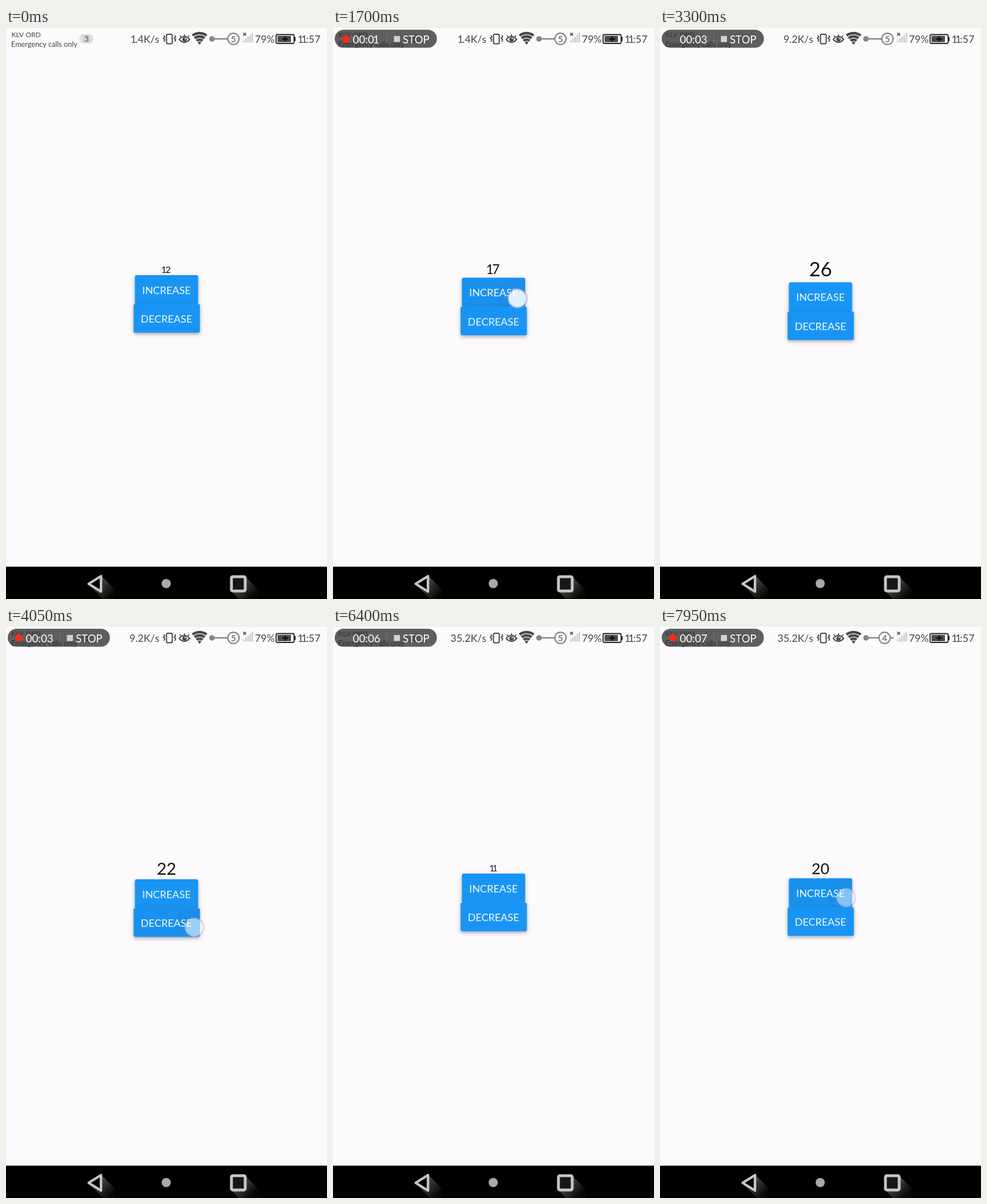
Write an HTML page with a canvas that moves like this. It is 561x998 px and loops after 8000 ms.

```html
<!DOCTYPE html>
<html lang="en">
<head>
<meta charset="utf-8">
<title>Counter</title>
<style>
html, body { margin: 0; width: 100%; height: 100%; overflow: hidden; background: #fcfafd; }
canvas { display: block; width: 100%; height: 100%; }
</style>
</head>
<body>
<canvas id="stage" width="561" height="998"></canvas>
<script>
const ctx = document.getElementById('stage').getContext('2d');
const LOOP = 8000, HOLD = 110, TIMER_START = 150;
const INK = '#444', GREY = '#858585', BLUE = '#1895f4';

// Each tap counts when the finger lifts.
const series = (start, period, count, step) =>
  Array.from({ length: count }, (_, i) => ({ at: start + i * period, step }));
const taps = [
  ...series(960, 157, 14, 1),
  ...series(3525, 165, 9, -1),
  ...series(4990, 130, 6, -1),
  ...series(6670, 155, 9, 1)
];

// Finger path: time, x, y
const path = [
  [960, 314, 468], [2400, 330, 477], [2900, 340, 482], [3100, 340, 484],
  [3400, 332, 534], [4050, 329, 525], [4900, 341, 513], [5640, 334, 508],
  [6500, 314, 462], [7950, 325, 473]
];

const clamp = v => Math.max(0, Math.min(1, v));

function fingerAt(t) {
  let i = 0;
  while (i < path.length - 2 && t > path[i + 1][0]) i++;
  const [t0, x0, y0] = path[i], [t1, x1, y1] = path[i + 1];
  const k = clamp((t - t0) / (t1 - t0));
  return [x0 + (x1 - x0) * k, y0 + (y1 - y0) * k];
}

function disc(x, y, r, color) {
  ctx.fillStyle = color;
  ctx.beginPath();
  ctx.arc(x, y, r, 0, 7);
  ctx.fill();
}

function box(x, y, w, h, r, color) {
  ctx.fillStyle = color;
  ctx.beginPath();
  ctx.roundRect(x, y, w, h, r);
  ctx.fill();
}

function outline(color, width, draw) {
  ctx.strokeStyle = color;
  ctx.lineWidth = width;
  ctx.beginPath();
  draw();
  ctx.stroke();
}

function poly(points) {
  points.forEach(([x, y], i) => i ? ctx.lineTo(x, y) : ctx.moveTo(x, y));
}

function setFont(size, color, weight = 400) {
  ctx.font = `${weight} ${size}px Lato, sans-serif`;
  ctx.fillStyle = color;
  ctx.textBaseline = 'alphabetic';
}

function text(str, x, mid, size, color, align = 'left') {
  setFont(size, color);
  ctx.textAlign = align;
  ctx.fillText(str, x, mid + size * 0.36);
}

// Proportional figures: the digit 1 takes less room than the others.
function figures(str, x, mid, size, color, align = 0) {
  setFont(size, color);
  ctx.textAlign = 'center';
  const widths = [...str].map(c => c === '1' ? size * 0.37 : ctx.measureText(c).width);
  x -= align * widths.reduce((a, b) => a + b, 0);
  [...str].forEach((c, i) => {
    ctx.fillText(c, x + widths[i] / 2, mid + size * 0.36);
    x += widths[i];
  });
}

function drawVibrate() {
  outline(INK, 2, () => ctx.roundRect(280.5, 11, 10, 16.5, 2));
  for (const x of [275, 294]) {
    outline(INK, 1.8, () => poly([[x + 1, 13], [x + 2.5, 15.5], [x, 18], [x + 2.5, 20.5], [x + 1, 24]]));
  }
}

function drawEye() {
  outline(INK, 2, () => {
    ctx.moveTo(302.5, 20);
    ctx.quadraticCurveTo(312, 9.5, 321, 20);
    ctx.quadraticCurveTo(312, 30, 302.5, 20);
  });
  disc(312, 20, 3.8, INK);
  disc(313.2, 18.7, 1.1, '#fcfafd');
  outline(INK, 1.6, () => {
    for (const [x, y, dx, dy] of [[312, 14, 0, -3], [306, 16, -2, -3], [318, 16, 2, -3]]) {
      ctx.moveTo(x, y);
      ctx.lineTo(x + dx, y + dy);
    }
  });
}

function drawWifi() {
  const from = -Math.PI * 0.71, to = -Math.PI * 0.29;
  for (const r of [20, 14.2, 8.6]) {
    outline('#484848', 4.4, () => ctx.arc(338.3, 29, r, from, to));
  }
  ctx.fillStyle = '#484848';
  ctx.beginPath();
  ctx.moveTo(338.3, 29.5);
  ctx.arc(338.3, 29, 5, from, to);
  ctx.fill();
}

function drawSlider(t) {
  const later = t >= 7000, x = later ? 392.5 : 397.5;
  disc(360, 19, 4.8, GREY);
  outline(GREY, 2.4, () => {
    ctx.moveTo(360, 19);
    ctx.lineTo(x - 10, 19);
    ctx.moveTo(x + 10, 19);
    ctx.lineTo(408.5, 19);
  });
  outline(GREY, 2.2, () => ctx.arc(x, 19, 9.8, 0, 7));
  setFont(15.5, '#777', 700);
  ctx.textAlign = 'center';
  ctx.fillText(later ? '4' : '5', x, 24.6);
}

function drawSignal() {
  for (let i = 0; i < 5; i++) {
    const h = 4 + i * 3.3;
    box(414.5 + i * 3.7, 25.5 - h, 2.5, h, 0, '#cbcacc');
  }
  outline(INK, 1.7, () => {
    poly([[414.5, 8.5], [419.5, 13.5]]);
    poly([[419.5, 8.5], [414.5, 13.5]]);
  });
}

function drawBattery() {
  outline('#222', 1.8, () => ctx.roundRect(472, 11.5, 31.5, 15.5, 2.5));
  box(504, 15.5, 2, 7.5, 0.5, '#222');
  box(474.5, 13.8, 23.5, 11, 0.5, '#4b4b4b');
  outline('#0c0c0c', 2.4, () => {
    poly([[483, 19.3], [493, 19.3]]);
    poly([[488, 14.6], [488, 24]]);
  });
}

function drawStatus(t) {
  text('KLV ORD', 9.5, 11.5, 12.2, INK);
  text('Emergency calls only', 9, 28, 12.7, INK);
  const g = ctx.createLinearGradient(127, 0, 154, 0);
  g.addColorStop(0, '#ebeaec');
  g.addColorStop(0.3, '#d8d7d9');
  g.addColorStop(0.7, '#d8d7d9');
  g.addColorStop(1, '#ebeaec');
  box(127.5, 11, 26, 16, 8, g);
  figures('3', 140.8, 19.2, 14, INK, 0.5);

  const speed = t < 3300 ? '1.4K/s' : t < 6250 ? '9.2K/s' : '35.2K/s';
  figures(speed, 268, 20, 17.8, INK, 1);
  drawVibrate();
  drawEye();
  drawWifi();
  drawSlider(t);
  drawSignal();
  figures('79%', 435, 19.5, 17.6, INK);
  drawBattery();
  figures('11:57', 549.5, 20, 17.8, INK, 1);
}

function drawRecorder(t) {
  const shown = clamp((t - 50) / 150);
  if (!shown) return;
  const elapsed = Math.max(0, t - TIMER_START);
  ctx.globalAlpha = shown;
  box(3, 3, 178.5, 31.5, 15.75, 'rgba(42,42,42,.75)');
  if (elapsed % 1000 >= 500) disc(22.5, 19, 6.5, '#fb2a1c');
  figures('00:0' + Math.floor(elapsed / 1000), 34.5, 20, 18.8, '#fff');
  box(93.5, 11, 1, 16, 0, '#777');
  box(106.5, 14, 10.5, 10.5, 0, '#d2d2d2');
  text('STOP', 122, 20, 18.6, '#fff');
  ctx.globalAlpha = 1;
}

function drawButton(x, y, w, h, label, press, finger) {
  ctx.save();
  ctx.shadowColor = 'rgba(0,0,0,.34)';
  ctx.shadowBlur = 6;
  ctx.shadowOffsetY = 2.5;
  box(x, y, w, h, 3, BLUE);
  ctx.restore();
  if (press > 0) {
    ctx.save();
    ctx.beginPath();
    ctx.roundRect(x, y, w, h, 3);
    ctx.clip();
    ctx.fillStyle = `rgba(40,70,110,${0.08 * press})`;
    ctx.fillRect(x, y, w, h);
    disc(finger[0] - 3, finger[1] - 2, 32, `rgba(40,70,110,${0.08 * press})`);
    ctx.restore();
  }
  text(label, 280.5, y + 26.3, 18, '#f6faff', 'center');
}

function drawTouch([x, y], alpha) {
  if (alpha <= 0) return;
  ctx.globalAlpha = alpha;
  disc(x, y, 16, 'rgba(255,255,255,.86)');
  outline('rgba(150,165,220,.25)', 4, () => ctx.arc(x, y, 16.3, 0, 7));
  outline('rgba(150,165,220,.4)', 2, () => ctx.arc(x, y, 16.3, 0, 7));
  ctx.globalAlpha = 1;
}

function drawLongShadow(points, x, y) {
  const g = ctx.createLinearGradient(x, y, x + 24, y + 24);
  g.addColorStop(0, '#4a4a4a');
  g.addColorStop(1, '#050505');
  ctx.fillStyle = g;
  ctx.beginPath();
  poly(points);
  ctx.fill();
}

function drawNav() {
  box(0, 941.5, 561, 56.5, 0, '#000');
  drawLongShadow([[167, 958], [190, 981], [190, 998], [170, 998], [144, 972]], 158, 970);
  drawLongShadow([[418, 959], [442, 983], [442, 998], [407, 998], [394, 984]], 407, 970);
  const arrow = [[144.5, 971.5], [166, 958], [166, 985]];
  ctx.fillStyle = '#000';
  ctx.beginPath();
  poly(arrow);
  ctx.fill();
  ctx.lineJoin = 'round';
  outline('#c6c6c6', 4.4, () => {
    poly(arrow);
    ctx.closePath();
  });
  box(395, 960, 23, 23, 2, '#161616');
  outline('#c6c6c6', 5, () => ctx.roundRect(394, 959, 24, 25, 2.5));
  ctx.lineJoin = 'miter';
  disc(280, 971, 8, '#a9a9a9');
}

function draw(t) {
  box(0, 0, 561, 998, 0, '#fcfafd');
  drawStatus(t);
  drawRecorder(t);

  let value = 12, touch = 0, up = 0, down = 0;
  for (const { at, step } of taps) {
    const held = t - at + HOLD, lifted = t - at;
    if (lifted >= 0) value += step;
    if (held < 0) continue;
    touch = Math.max(touch, clamp(1 - lifted / 90));
    const press = Math.min(clamp(held / HOLD), clamp(1 - lifted / 75));
    if (step > 0) up = Math.max(up, press);
    else down = Math.max(down, press);
  }

  const finger = fingerAt(t), top = 432 + (value - 12) * 0.9;
  figures(String(value), 280.5, 422, value * 1.33, '#111', 0.5);
  drawButton(225.3, top, 110.5, 50.5, 'INCREASE', up, finger);
  drawButton(223, top + 50.3, 115.8, 50.3, 'DECREASE', down, finger);
  drawTouch(finger, touch);
  drawNav();
}

function tick() {
  draw(performance.now() % LOOP);
  requestAnimationFrame(tick);
}
tick();
</script>
</body>
</html>
```
